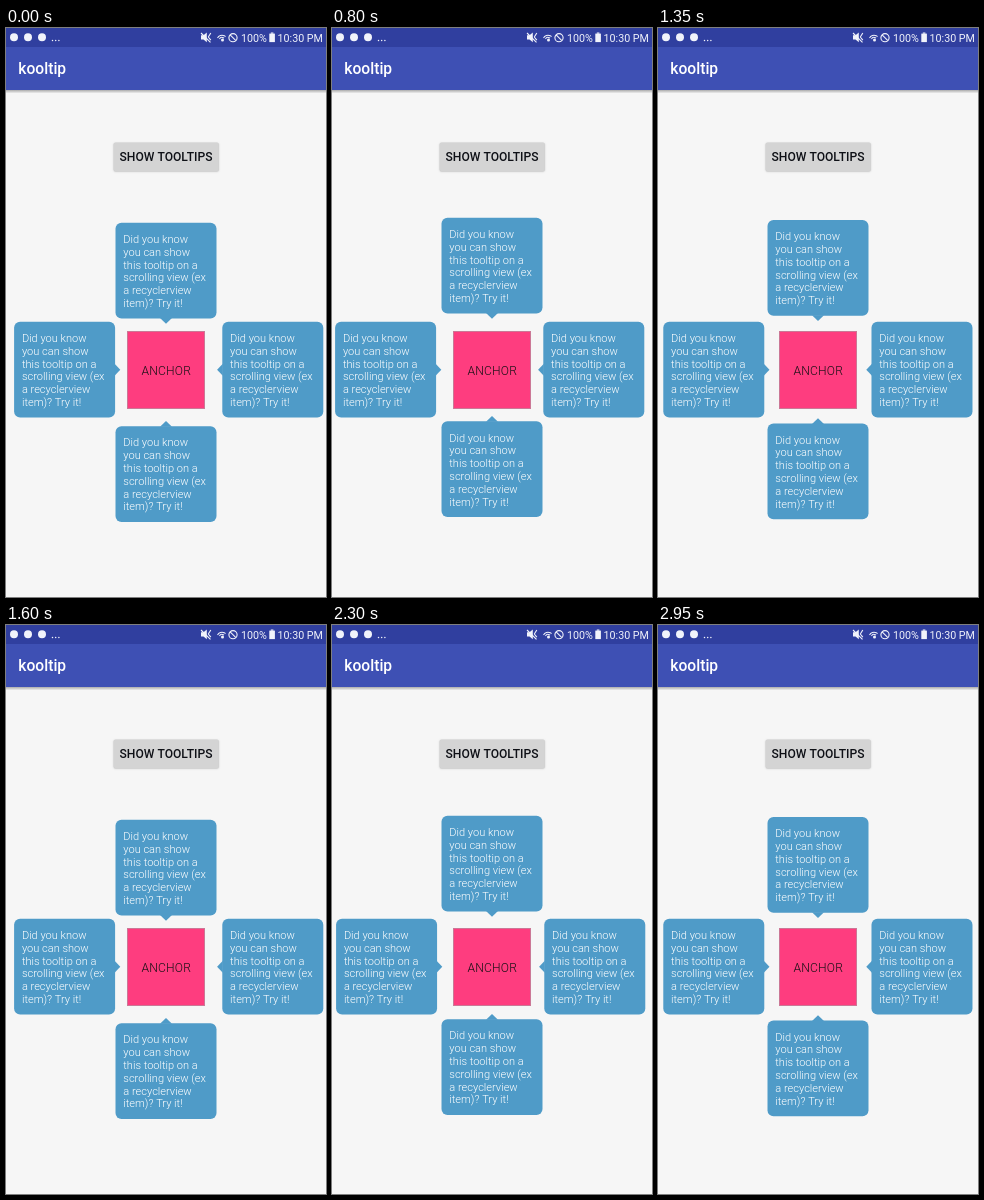
Animation of 320x569 px, one loop 3000 ms. Source, as an HTML page with a canvas:

```html
<!DOCTYPE html>
<html lang="en">
<head>
<meta charset="utf-8">
<title>Tooltips</title>
<style>
html, body { margin: 0; width: 100%; height: 100%; overflow: hidden; background: #f6f6f6; }
canvas { display: block; width: 320px; height: 569px; }
</style>
</head>
<body>
<canvas id="stage"></canvas>
<script>
const W = 320, H = 569, LOOP = 3000, STEP = 50, PERIOD = 1600;
const BLUE = '#4f9bc8';
const LINES = ['Did you know', 'you can show', 'this tooltip on a',
  'scrolling view (ex', 'a recyclerview', 'item)? Try it!'];
const BOX = { w: 101, h: 95.8, r: 6 };

const canvas = document.getElementById('stage');
const ctx = canvas.getContext('2d');
const dpr = window.devicePixelRatio || 1;
canvas.width = W * dpr;
canvas.height = H * dpr;
ctx.scale(dpr, dpr);

function rect(x, y, w, h, color) {
  ctx.fillStyle = color;
  ctx.fillRect(x, y, w, h);
}

function disc(x, y, r, color) {
  ctx.fillStyle = color;
  ctx.beginPath();
  ctx.arc(x, y, r, 0, Math.PI * 2);
  ctx.fill();
}

function poly(points, color) {
  ctx.fillStyle = color;
  ctx.beginPath();
  points.forEach(([x, y]) => ctx.lineTo(x, y));
  ctx.closePath();
  ctx.fill();
}

function line(x1, y1, x2, y2, color, width) {
  ctx.strokeStyle = color;
  ctx.lineWidth = width;
  ctx.beginPath();
  ctx.moveTo(x1, y1);
  ctx.lineTo(x2, y2);
  ctx.stroke();
}

function label(text, x, y, size, weight, color, align = 'left') {
  ctx.font = `${weight} ${size}px Roboto, sans-serif`;
  ctx.textAlign = align;
  ctx.fillStyle = color;
  ctx.fillText(text, x, y);
}

function statusBar() {
  const ink = '#f1f3fb';
  rect(0, 0, W, 19, '#303f9f');
  [8, 22, 36].forEach(x => disc(x, 9.3, 4, ink));
  [46.5, 49.7, 52.9].forEach(x => disc(x, 12.6, 0.75, ink));

  // muted speaker with vibration marks
  poly([[195, 7.3], [197.5, 7.3], [200.8, 4.6], [200.8, 14.2], [197.5, 11.5], [195, 11.5]], ink);
  line(195, 5, 204.5, 14.3, ink, 1.1);
  line(204.8, 5, 202.3, 9, ink, 1.1);
  line(202.3, 9, 204.8, 12.2, ink, 1.1);

  // wireless arcs
  ctx.strokeStyle = ink;
  ctx.lineWidth = 1.1;
  [2.8, 5].forEach(r => {
    ctx.beginPath();
    ctx.arc(216, 12.2, r, -Math.PI * 0.85, -Math.PI * 0.25);
    ctx.stroke();
  });
  disc(216.5, 12, 1.5, ink);

  // blocked sign
  ctx.strokeStyle = ink;
  ctx.lineWidth = 1.1;
  ctx.beginPath();
  ctx.arc(227, 9.7, 4.1, 0, Math.PI * 2);
  ctx.stroke();
  line(224.1, 6.8, 229.9, 12.6, ink, 1.1);

  label('100%', 235, 13.8, 10.7, 400, ink);
  rect(263.3, 5.6, 5.6, 8.5, ink);
  rect(264.8, 4.5, 2.6, 1.2, ink);
  label('10:30 PM', 271.6, 13.8, 10.7, 400, ink);
}

function appBar() {
  const shade = ctx.createLinearGradient(0, 62, 0, 65.5);
  shade.addColorStop(0, 'rgba(0,0,0,.3)');
  shade.addColorStop(1, 'rgba(0,0,0,0)');
  rect(0, 62, W, 3.5, shade);
  rect(0, 19, W, 43, '#3e50b4');
  label('kooltip', 12.3, 46.3, 15.6, 500, '#fff');
}

function button() {
  ctx.save();
  ctx.shadowColor = 'rgba(0,0,0,.28)';
  ctx.shadowBlur = 1.6 * dpr;
  ctx.shadowOffsetY = 0.5 * dpr;
  ctx.fillStyle = '#d4d4d4';
  ctx.beginPath();
  ctx.roundRect(107.7, 114.5, 105, 28.6, 1.6);
  ctx.fill();
  ctx.restore();
  label('SHOW TOOLTIPS', 160, 133.4, 12.1, 500, '#0e1016', 'center');
}

function anchor() {
  rect(121, 303, 78, 78, '#fe3d7f');
  ctx.strokeStyle = 'rgba(170,160,165,.6)';
  ctx.lineWidth = 1;
  ctx.strokeRect(121.5, 303.5, 77, 77);
  ctx.letterSpacing = '0.2px';
  label('ANCHOR', 160.3, 346.5, 12.1, 300, '#161014', 'center');
  ctx.letterSpacing = '0px';
}

// (ax, ay) points from the bubble to its arrow
function tooltip(x, y, ax, ay) {
  const cx = x + BOX.w / 2, cy = y + BOX.h / 2;
  const ex = cx + ax * (BOX.w / 2 - 0.5), ey = cy + ay * (BOX.h / 2 - 0.5);
  ctx.fillStyle = BLUE;
  ctx.beginPath();
  ctx.roundRect(x, y, BOX.w, BOX.h, BOX.r);
  ctx.fill();
  poly([
    [ex - ay * 6, ey - ax * 6],
    [ex + ax * 5.7, ey + ay * 5.7],
    [ex + ay * 6, ey + ax * 6]
  ], BLUE);
  LINES.forEach((text, i) =>
    label(text, x + 7.8, y + 20.2 + i * 12.8, 11.05, 300, '#fff'));
}

function draw(time) {
  const t = time < 2 * STEP ? 0 : Math.floor(time / STEP) * STEP;
  const d = -2.5 + 3.23 * Math.cos((t - 175) / PERIOD * Math.PI * 2);
  rect(0, 0, W, H, '#f6f6f6');
  appBar();
  statusBar();
  button();
  anchor();
  tooltip(109.5, 194.8 + d, 0, 1);
  tooltip(8.1 + d, 293.8, 1, 0);
  tooltip(216.3 + d, 293.8, -1, 0);
  tooltip(109.5, 398.3 + d, 0, -1);
}

const start = performance.now();
function tick() {
  draw((performance.now() - start) % LOOP);
  requestAnimationFrame(tick);
}
tick();
</script>
</body>
</html>
```
